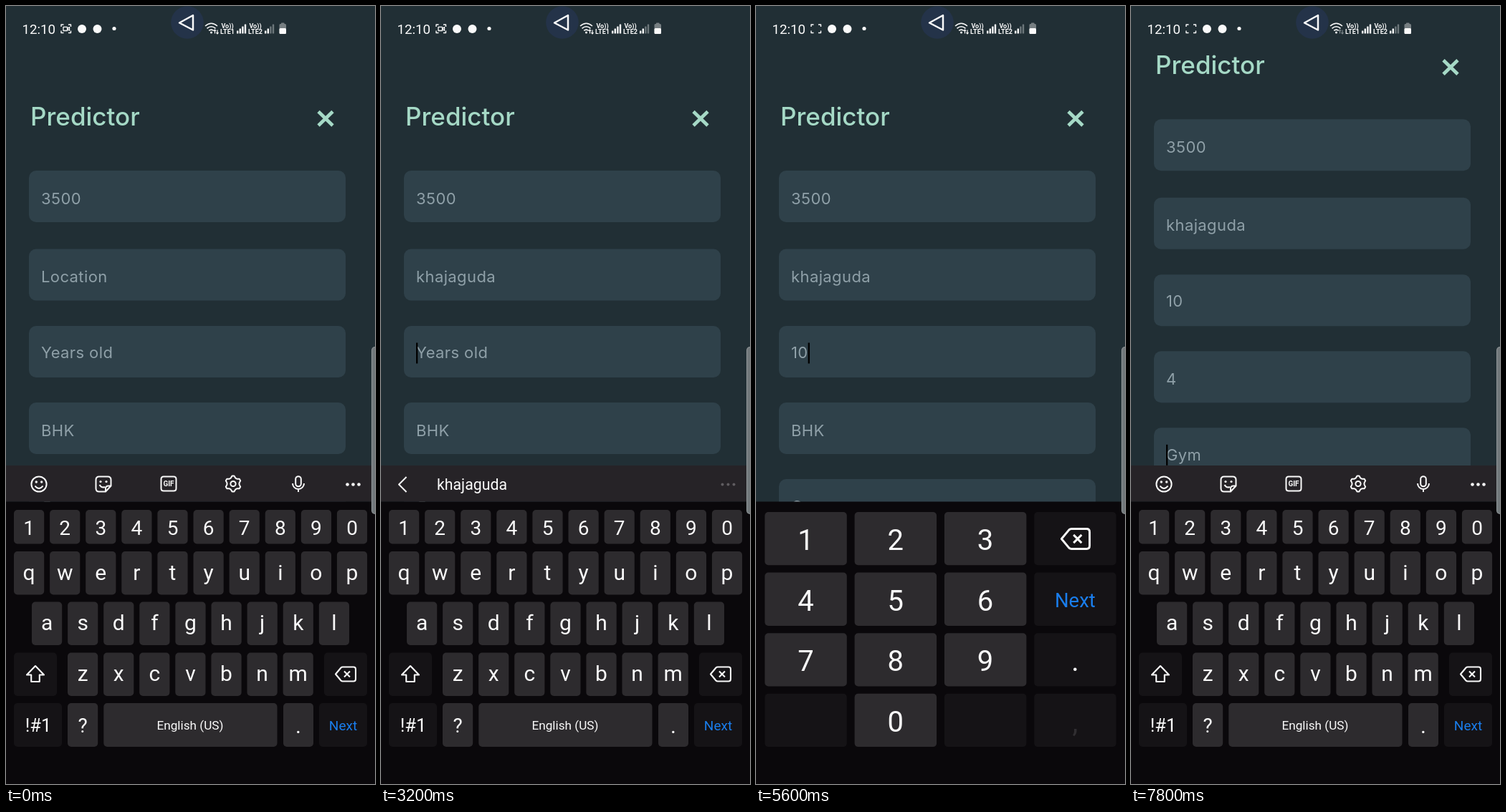
An HTML page with a canvas that plays this animation: 515 px wide and 1087 px high, repeating every 8 s.

```html
<!DOCTYPE html>
<html lang="en">
<head>
<meta charset="utf-8">
<title>Predictor form</title>
<style>
html, body { margin: 0; width: 515px; height: 1087px; overflow: hidden; background: #212f35; }
canvas { display: block; }
</style>
</head>
<body>
<canvas id="stage" width="515" height="1087"></canvas>
<script>
const ctx = document.getElementById('stage').getContext('2d');
const LOOP = 8000, STEP = 200;
const WHITE = '#fafafa', MINT = '#a5d9c6', KEY = '#2d2b2e', DARK_KEY = '#151316',
  PRESSED = '#3d3b3e', BLUE = '#1a7eed';
const PLACE = 'khajaguda';
const FIELD_TOPS = [230, 339.5, 447, 554, 661];
const BASELINES = [47, 46, 45, 47, 45.5];
const TYPED_AT = [400, 600, 800, 1000, 1200, 1400, 1600, 2000, 2400];

function box(x, y, w, h, r, fill) {
  ctx.fillStyle = fill;
  ctx.beginPath();
  ctx.roundRect(x, y, w, h, r);
  ctx.fill();
}

function disc(x, y, r, fill) {
  ctx.fillStyle = fill;
  ctx.beginPath();
  ctx.arc(x, y, r, 0, Math.PI * 2);
  ctx.fill();
}

function text(str, x, y, size, fill = WHITE, align = 'center', weight = 400, family = 'Roboto') {
  ctx.font = `${weight} ${size}px ${family}, sans-serif`;
  ctx.fillStyle = fill;
  ctx.textAlign = align;
  ctx.fillText(str, x, y);
}

function line(path, width = 2, color = WHITE) {
  ctx.strokeStyle = color;
  ctx.lineWidth = width;
  ctx.stroke(new Path2D(path));
}

function at(x, y, scale, draw) {
  ctx.save();
  ctx.translate(x, y);
  ctx.scale(scale, scale);
  draw();
  ctx.restore();
}

function stateAt(t) {
  const count = TYPED_AT.filter(v => t >= v).length;
  const focus = t < 3200 ? 1 : t < 6000 ? 2 : t < 7600 ? 3 : 4;
  const years = t < 5200 ? '' : t < 5400 ? '1' : '10';
  const blink = start => (t - start + LOOP) % 1000 < 500;
  let cursor;
  if (t < 3200) cursor = t >= 200 && t < 3000;
  else if (t < 5200) cursor = blink(3100);
  else if (t < 6000) cursor = true;
  else if (t < 7000) cursor = blink(5900);
  else cursor = true;
  return {
    t, count, focus, cursor,
    values: ['3500', PLACE.slice(0, count), years, t < 7200 ? '' : '4', ''],
    pad: t >= 3400 && t < 7800,
    scroll: t >= 7800 ? 71.7 : 0,
    nextDown: t === 3000 || t === 5800 || t === 7400,
    recording: t % 1000 < 600
  };
}

function drawForm(s) {
  const hints = ['', 'Location', 'Years old', 'BHK', 'Gym'];
  ctx.save();
  ctx.translate(0, -s.scroll);
  text('Predictor', 34, 166.5, 35, MINT, 'left', 500, 'Inter');
  line('M436 147.5L456 167M456 147.5L436 167', 4.8, MINT);
  ctx.letterSpacing = '0.4px';
  FIELD_TOPS.forEach((top, i) => {
    box(32, top, 442, 72, 10, '#2f414a');
    text(s.values[i] || hints[i], 49, top + BASELINES[i], 22, '#8fa0a8', 'left', 400, 'Inter');
    if (i !== s.focus) return;
    const width = s.values[i] ? ctx.measureText(s.values[i]).width : 0;
    if (i === 1 && width) {
      ctx.fillStyle = '#a9b4b9';
      ctx.fillRect(49, top + 49.5, width, 1.2);
    }
    if (s.cursor) {
      ctx.fillStyle = '#000';
      ctx.fillRect(49 + width, top + 23.5, 2.3, 29);
    }
  });
  ctx.letterSpacing = '0px';
  ctx.restore();
}

function signal(x, bars) {
  for (let i = 0; i < 4; i++) {
    const h = 4 + i * 3;
    box(x + i * 3.6, 38.5 - h, 2.4, h, 0.5, i < bars ? WHITE : '#6d777b');
  }
}

function drawStatus(s) {
  text('12:10', 22.5, 38.5, 18.7, WHITE, 'left');
  line('M77 29V26H80.5M87 26H90.5V29M90.5 34.5V37.5H87M80.5 37.5H77V34.5', 1.4);
  if (s.recording) {
    line('M80 29.3H85.5V34.5H80ZM86 31.5L88.5 29.5V34.3L86 32.5', 1.3);
  }
  disc(106, 32, 6, WHITE);
  disc(127.5, 32, 6, WHITE);
  disc(151, 31.5, 2.6, WHITE);

  line('M262 26L264 29L262 32L264 35L262 38M269 25L271 28L269 31L271 34L269 37', 1.4, '#a6adb0');
  disc(253, 23, 22.8, '#243349');
  line('M242 23.5L261 13V33.5Z', 2.5);

  line('M278 28Q286.5 20.5 295 28', 1.6);
  line('M280.5 31.3Q286.5 26.2 292.5 31.3', 1.6);
  line('M283.2 34.4Q286.5 31.7 289.8 34.4', 1.6);
  disc(286.5, 37, 1.5, WHITE);
  const dim = '#7d878a';
  line('M291.5 38.5V33.5M290 35L291.5 33L293 35', 1.2, s.t >= 6400 ? dim : WHITE);
  line('M295 33.5V38.5M293.5 37L295 39L296.5 37', 1.2, s.t >= 6400 ? dim : WHITE);
  [[309, 1], [348, 2]].forEach(([x, n]) => {
    text('Vo))', x, 30.5, 9, WHITE, 'center', 700);
    text('LTE' + n, x, 39, 9, WHITE, 'center', 700);
  });
  signal(322, 4);
  signal(361, 2);
  box(384, 23.5, 4.5, 2.5, 0.5, '#777f82');
  box(381.5, 25, 9.5, 14, 1.5, '#777f82');
  box(381.5, 31, 9.5, 8, 1.5, WHITE);
}

function backspace(x, y, scale) {
  at(x, y, scale, () => {
    line('M-14 0L-6.5 -9Q-5.5 -10 -4 -10H11Q14 -10 14 -7V7Q14 10 11 10H-4Q-5.5 10 -6.5 9Z', 2.1);
    line('M-2 -4L6 4M6 -4L-2 4', 2.1);
  });
}

function drawGear(x, y) {
  at(x, y, 1, () => {
    ctx.beginPath();
    for (let i = 0; i < 24; i++) {
      const a = (i - 0.5) * Math.PI / 12, r = i % 4 < 2 ? 11 : 8.6;
      ctx.lineTo(r * Math.sin(a), -r * Math.cos(a));
    }
    ctx.closePath();
    ctx.strokeStyle = WHITE;
    ctx.lineWidth = 2;
    ctx.stroke();
    line('M3.6 0A3.6 3.6 0 1 1 -3.6 0A3.6 3.6 0 1 1 3.6 0', 2);
  });
}

function drawTools() {
  at(46, 668, 1, () => {
    line('M10.6 0A10.6 10.6 0 1 1 -10.6 0A10.6 10.6 0 1 1 10.6 0', 2);
    line('M-5.5 2.5Q0 9.5 5.5 2.5', 2);
    disc(-3.7, -3, 1.7, WHITE);
    disc(3.7, -3, 1.7, WHITE);
  });
  at(136, 668, 1, () => {
    line('M3 10.5H-6Q-10.5 10.5 -10.5 6V-6Q-10.5 -10.5 -6 -10.5H6Q10.5 -10.5 10.5 -6V2.5L3 10.5V6Q3 2.5 7 2.5H10.5', 2);
    line('M-5.5 1Q-2.5 6 2 4', 2);
    disc(-4, -3.5, 1.6, WHITE);
    disc(4, -3.5, 1.6, WHITE);
  });
  line('M220 657.5H234Q237.5 657.5 237.5 661V674Q237.5 677.5 234 677.5H220Q216.5 677.5 216.5 674V661Q216.5 657.5 220 657.5Z', 2);
  text('GIF', 227, 671.2, 10, WHITE, 'center', 700);
  drawGear(317, 667.5);
  line('M404.2 661A3.8 3.8 0 0 1 411.8 661V667.5A3.8 3.8 0 0 1 404.2 667.5Z', 2);
  line('M400 667A8 8 0 0 0 416 667M408 675V679', 2);
}

function drawSuggestions(s) {
  const mid = 676, size = 21.3;
  line('M35.5 658L25 668.5L35.5 679', 2);
  if (s.t >= 2400) {
    text(PLACE, 127, mid, size);
  } else if (s.t === 2000) {
    text('khajag', 95, mid, size, WHITE, 'left');
    text('u', 158.5, mid, 18, '#8b898c', 'left');
    text(PLACE, 257.5, mid, size);
  } else {
    text(PLACE.slice(0, s.count), 132, mid, size);
    if (s.count > 5) text(PLACE, 257.5, mid, size);
  }
}

function drawKeyboard(s) {
  const row = (chars, x, y, h, base, size) => [...chars].forEach((c, i) => {
    const left = x + i * 50.1;
    box(left, y, 42.2, h, 5, KEY);
    text(c, left + 21.1, base, size);
  });
  box(0, 642, 515, 50.5, 0, '#262327');
  box(0, 692.5, 515, 394.5, 0, '#0a080b');
  const tools = s.count === 0 || s.t >= 7800;
  if (tools) drawTools(); else drawSuggestions(s);
  for (const x of [476.5, 484.5, 492.5]) disc(x, 668.5, tools ? 2.3 : 2, tools ? WHITE : '#5f5c60');

  row('1234567890', 11, 704, 47.5, 739, 28);
  row('qwertyuiop', 11, 762, 60.5, 802, 30);
  row('asdfghjkl', 36, 832.5, 60.5, 872, 30);
  row('zxcvbnm', 86, 903.5, 60.5, 943, 30);
  box(11, 903.5, 60, 60.5, 5, DARK_KEY);
  line('M41 922L53 934.5H46.8V944H35.2V934.5H29Z', 2.1);
  box(444, 903.5, 60, 60.5, 5, DARK_KEY);
  backspace(474, 933.5, 1);

  box(11, 974, 67, 61, 5, DARK_KEY);
  text('!#1', 45, 1014, 25.5);
  box(86, 974, 42.2, 61, 5, KEY);
  text('?', 107, 1015, 28);
  box(136.3, 974, 242.2, 61, 5, KEY);
  text('English (US)', 257, 1011, 17.2);
  box(387, 974, 42, 61, 5, KEY);
  text('.', 408, 1016, 30);
  box(437, 974, 67, 61, 5, s.nextDown ? PRESSED : DARK_KEY);
  text('Next', 470.5, 1011.5, 19, s.nextDown ? WHITE : BLUE);
}

function drawPad(s) {
  box(0, 692.5, 515, 394.5, 0, '#0a080b');
  const rows = [['1', '2', '3', ''], ['4', '5', '6', 'Next'], ['7', '8', '9', '.'], ['', '0', '', ',']];
  rows.forEach((labels, r) => labels.forEach((label, c) => {
    const x = 12.3 + c * 125.3, y = 707 + r * 84.6, mid = x + 57.2;
    const isNext = label === 'Next', down = isNext && s.nextDown;
    box(x, y, 114.5, 74.3, 5, down ? PRESSED : /\d/.test(label) ? KEY : DARK_KEY);
    if (isNext) text(label, mid, y + 48, 27.5, down ? WHITE : BLUE);
    else text(label, mid, y + 53, 40, label === ',' ? '#302e31' : WHITE);
  }));
  backspace(446, 744.5, 1.4);
}

function drawEdgeHandle() {
  box(510, 476, 10, 234, 5, '#8b9194');
  box(511.2, 477.2, 10, 231.6, 4, '#71787b');
}

function render(now) {
  const t = Math.floor((now % LOOP) / STEP) * STEP;
  const s = stateAt(t);
  ctx.lineJoin = 'round';
  box(0, 0, 515, 1087, 0, '#212f35');
  drawForm(s);
  drawStatus(s);
  if (s.pad) drawPad(s); else drawKeyboard(s);
  drawEdgeHandle();
}

const start = performance.now();
function tick() {
  render(performance.now() - start);
  requestAnimationFrame(tick);
}
tick();
</script>
</body>
</html>
```
